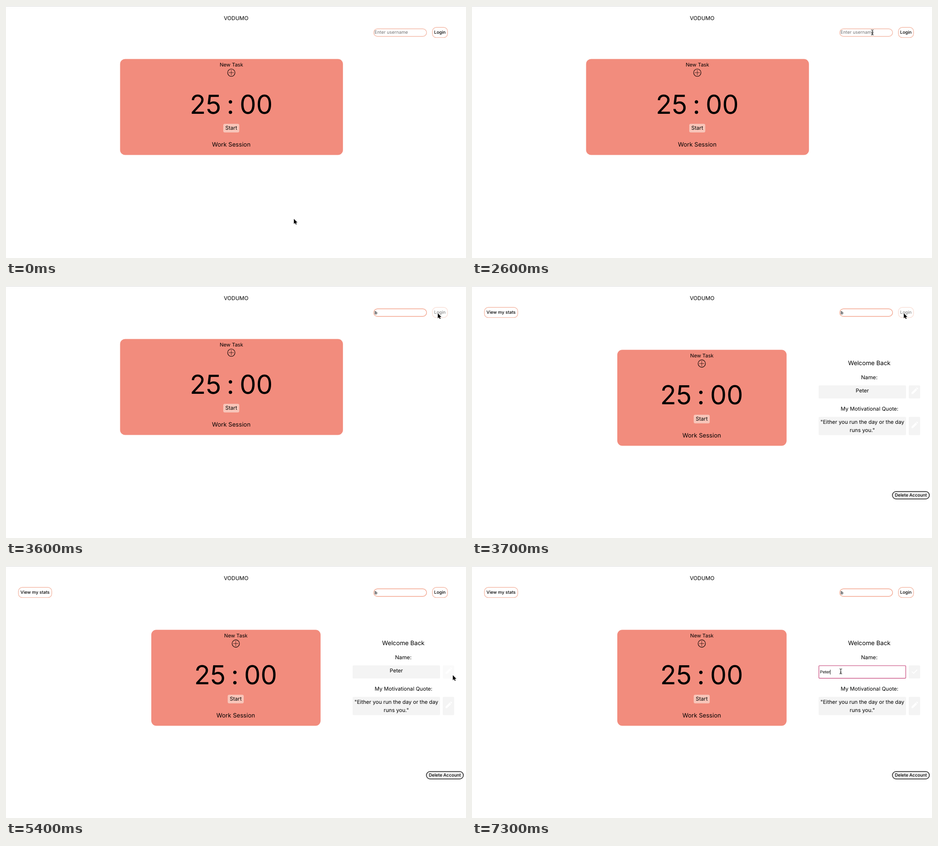
Recreate the animation shown at these times as an HTML page. Size 1010 by 554 pixels, loop 8 s.

```html
<!DOCTYPE html>
<html lang="en">
<head>
<meta charset="utf-8">
<title>Focus timer</title>
<style>
  html, body { margin: 0; width: 100%; height: 100%; overflow: hidden; background: #fff; }
  svg { display: block; width: 1010px; height: 554px; }
  text { font: 11.6px Inter, "Open Sans", sans-serif; text-anchor: middle; text-rendering: geometricPrecision; }
  .left { text-anchor: start; }
  .small { font-size: 9.6px; font-weight: 500; }
  .clock { font-size: 57.5px; }
  .edit text { font: 9.3px "Liberation Sans", Arial, sans-serif; text-anchor: start; }
  .edit rect { fill: #fff; stroke-width: 1.4; }
  .pill { fill: #fff; stroke: #f4bba9; stroke-width: 1.4; }
  .typed .pill.name { stroke: #f3a68f; }
  .box { fill: #f4f4f4; }
  .icon { fill: #fff; }
  .hover { opacity: .45; }
  .off { display: none; }
</style>
</head>
<body>
<svg id="stage" viewBox="0 0 1010 554">
  <defs>
    <path id="pencil" class="icon" d="M-6.5 6.5V3.3L2.6-5.8 5.8-2.6-3.3 6.5ZM3.5-6.7 4.6-7.8Q5.2-8.3 5.8-7.8L7.8-5.8Q8.3-5.2 7.8-4.6L6.7-3.5Z"/>
  </defs>
  <path d="M0 .5H1010" stroke="#dadada"/>
  <text x="505.3" y="31" style="font-size:11.9px">VODUMO</text>

  <rect class="pill name" x="807.3" y="50.2" width="116.2" height="16.6" rx="8.3"/>
  <text id="hint" class="left" x="809" y="61.3" fill="#757575" style="font-size:9.9px">Enter username</text>
  <text id="typed" class="left small" x="809.2" y="61.5">b</text>
  <g id="login">
    <rect class="pill" x="936.3" y="47" width="33.2" height="22.4" rx="8.5"/>
    <text class="small" x="952.7" y="61.4">Login</text>
  </g>

  <rect id="card" y="116.5" height="211" rx="11" fill="#f28c7d"/>
  <g id="timer">
    <text x="494.9" y="133.2" style="font-size:11.1px">New Task</text>
    <g fill="none" stroke="#000">
      <circle cx="494.7" cy="146.6" r="8.1" stroke-width="1.1"/>
      <path d="M489 146.6H500.4M494.7 140.9V152.3" stroke-width=".9" opacity=".75"/>
    </g>
    <text class="clock" x="438" y="236.6">25</text>
    <text class="clock" x="492.7" y="236.6">:</text>
    <text class="clock" x="549.2" y="236.6">00</text>
    <rect x="477" y="259" width="35.2" height="19" rx="3.5" fill="#f8c5b9"/>
    <text x="494.6" y="272.4">Start</text>
    <text x="494.6" y="308.7" style="font-size:13.1px">Work Session</text>
  </g>

  <g id="account">
    <rect class="pill" x="27.3" y="47" width="73.2" height="22.4" rx="8.5"/>
    <text class="small" x="63.8" y="61.4">View my stats</text>
    <rect x="923" y="451.8" width="81.3" height="16.4" rx="8.2" fill="#efefef" stroke="#222" stroke-width="1.5"/>
    <text class="small" x="963.6" y="463.3">Delete Account</text>

    <g id="upper">
      <text x="872.3" y="173.6" style="font-size:13.3px">Welcome Back</text>
      <text x="872.3" y="205.2" style="font-size:11.8px">Name:</text>
    </g>
    <g id="shown">
      <rect class="box" x="761" y="218.5" width="192" height="28.8" rx="2"/>
      <text x="857" y="234">Peter</text>
    </g>
    <g id="wide" class="edit">
      <rect x="761.6" y="222.6" width="207.8" height="21" rx="1.5" stroke="#dc6ba6"/>
      <text x="764" y="236.4">Peter</text>
      <rect x="976" y="222" width="8" height="22" rx="2" style="fill:#f7f7f7"/>
    </g>
    <g id="field" class="edit">
      <rect x="761.6" y="219.1" width="190.8" height="27.6" rx="1.5" stroke="#cd5d8b"/>
      <text x="764" y="236.4">Peter</text>
    </g>
    <path id="caret" d="M786.7 228V238.5" stroke="#000" stroke-width=".9"/>
    <g id="button">
      <rect class="box" x="959" y="218.5" width="25" height="28.8" rx="2"/>
      <use id="pen" href="#pencil" x="971.5" y="231"/>
      <path id="tick" d="M965.7 232.2 969.6 236 977.5 228" fill="none" stroke="#fff" stroke-width="1.8"/>
    </g>
    <g id="lower">
      <text x="872.8" y="274.3">My Motivational Quote:</text>
      <rect class="box" x="761" y="287.8" width="192" height="40" rx="2"/>
      <text x="857" y="303.4">"Either you run the day or the day</text>
      <text x="857" y="320.8">runs you."</text>
      <rect class="box" x="959" y="287.8" width="25" height="40" rx="2"/>
      <use href="#pencil" x="971.5" y="306"/>
    </g>
  </g>

  <g id="pointer">
    <path id="arrow" d="M0 0V11L2.6 8.7 4.4 12.6 6.2 11.8 4.5 8H7.9Z" stroke="#fff" stroke-width=".9" paint-order="stroke"/>
    <path id="beam" d="M-2.8-5.5Q0-5.5 0-4V4Q0 5.5-2.8 5.5M2.8-5.5Q0-5.5 0-4V4Q0 5.5 2.8 5.5M-1.4 2H1.4" fill="none" stroke="#111" stroke-width="1.1"/>
  </g>
</svg>
<script>
const LOOP = 8000, TICK = 100;
const $ = id => document.getElementById(id);
const show = (id, on) => $(id).classList.toggle('off', !on);
const move = (id, x, y) => $(id).setAttribute('transform', `translate(${x} ${y})`);

// Pointer path: time, x, y
const path = [
  [0, 632, 468], [100, 518, 170], [200, 690, 30], [300, 857, 78],
  [500, 857, 78], [700, 865, 62], [900, 873, 58],
  [1300, 873, 58], [1500, 878, 58], [2500, 878, 58], [2600, 879, 58],
  [2700, 879, 58], [2800, 932, 219], [2900, 932, 219],
  [3200, 940, 138], [3500, 948, 64], [3600, 948, 60],
  [4200, 948, 60], [4400, 937, 150], [4600, 931, 189],
  [4900, 931, 189], [5200, 961, 218], [5400, 981, 240], [5600, 979, 244], [5800, 973, 233],
  [6300, 973, 233], [6700, 890, 237], [7100, 807, 232], [7300, 809.7, 231.5], [LOOP, 809.7, 231.5]
];

function pointerAt(t) {
  const i = path.findIndex(p => p[0] > t);
  const [t0, x0, y0] = path[i - 1], [t1, x1, y1] = path[i];
  const k = (t - t0) / (t1 - t0);
  return [x0 + (x1 - x0) * k, y0 + (y1 - y0) * k];
}

function draw(now) {
  const t = Math.floor(now % LOOP / TICK) * TICK;
  const [x, y] = pointerAt(t);
  const over = (l, top, r, b) => x >= l && x <= r && y >= top && y <= b;
  const typed = t >= 2800, user = t >= 3700, edit = t >= 6300;
  const resizing = t === 6300;

  $('stage').classList.toggle('typed', typed);
  show('hint', !typed);
  show('typed', typed);
  show('account', user);
  $('card').setAttribute('x', user ? 319 : 250.5);
  $('card').setAttribute('width', user ? 371.7 : 489.3);
  move('card', 0, user ? 23.8 : 0);
  move('timer', user ? 9.8 : 0, user ? 23.9 : 0);

  show('shown', !edit);
  show('wide', resizing);
  show('field', edit && !resizing);
  show('button', !resizing);
  show('pen', !edit);
  show('tick', edit);
  show('caret', edit && (t < 6800 || t >= 7300));
  move('upper', 0, resizing ? 3.4 : 0);
  move('lower', 0, resizing ? -3.5 : 0);

  $('login').classList.toggle('hover', over(936, 46, 970, 70));
  $('button').classList.toggle('hover', user && over(959, 218, 984, 247));

  const beam = over(807, 50, 924, 67) || edit && !resizing && over(761, 219, 953, 247);
  show('beam', beam);
  show('arrow', !beam);
  move('pointer', x, y);
}

function loop() {
  draw(performance.now());
  requestAnimationFrame(loop);
}
loop();
</script>
</body>
</html>
```
